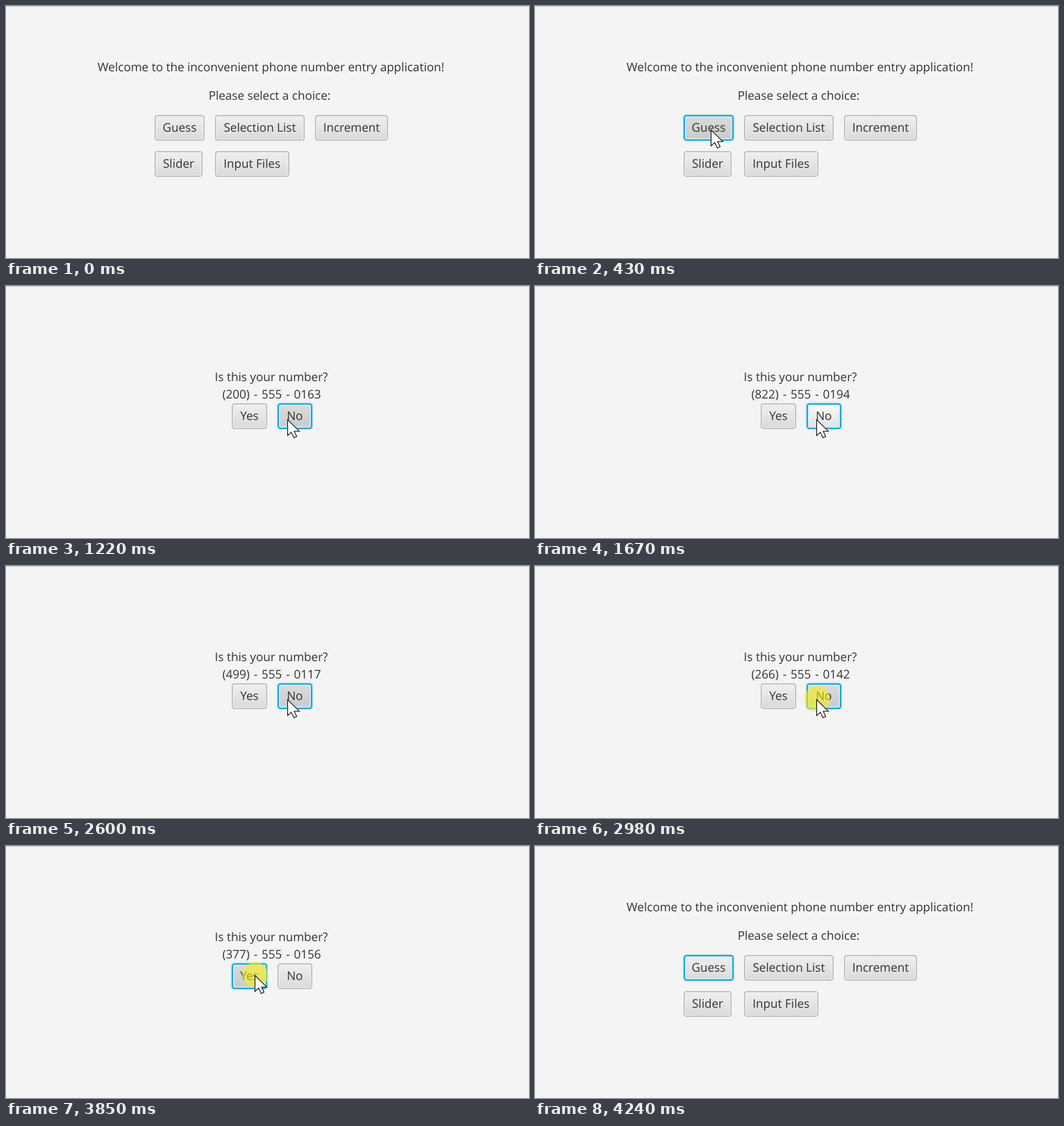
Animation, 753 px wide and 363 px high, one loop 4290 ms. Source, as an HTML page:

```html
<!DOCTYPE html>
<html lang="en">
<head>
<meta charset="utf-8">
<title>Inconvenient phone number entry</title>
<style>
:root {
  --up: linear-gradient(#f0f0f0, #d9d9d9);
  --over: linear-gradient(#fafafa, #e1e1e1);
  --down: linear-gradient(#dcdcdc, #c9c9c9);
  --plain: 0 0 0 0 transparent, inset 0 0 0 1.5px #b5b5b5, inset 0 0 0 2.6px #f6f6f6;
  --focus: 0 0 0 2px #039ed322, inset 0 0 0 1.8px #039ed3, inset 0 0 0 3.6px #d4e9f0;
}
html, body { margin: 0; width: 100%; height: 100%; overflow: hidden; background: #f4f4f4; }
body {
  position: relative;
  font: 17.1px/25px "Open Sans", "Noto Sans", sans-serif;
  color: #333;
  text-rendering: geometricPrecision;
  white-space: nowrap;
}
body::before { content: ""; position: absolute; inset: 0 0 auto; height: 1px; background: #bcbcbc; }
p, .btn, .num, .mouse, .mouse svg { position: absolute; margin: 0; }
p, .num { left: calc(var(--c) * 1px - 300px); top: calc(var(--y) * 1px); width: 600px; text-align: center; }
.btn {
  left: calc(var(--x) * 1px); top: calc(var(--y) * 1px); width: calc(var(--w) * 1px);
  height: 37px; line-height: 37px; text-align: center;
  border-radius: 4.5px; background-image: var(--up); box-shadow: var(--plain);
}
.num { height: 25px; overflow: hidden; word-spacing: 1.4px; }
.mouse { left: 0; top: 0; }
.mouse svg { left: 0; top: 0; overflow: visible; }
.spot { fill: #f5f014; fill-opacity: .6; }
.arrow { fill: #fff; stroke: #111; stroke-width: 1.1; }

/* 1% of the loop is 42.9 ms */
#menu, #ask, .btn, .num div, .mouse svg, .spot { animation: 4290ms step-end infinite; }
#menu { animation-name: menu; }
#ask { animation-name: ask; }
#guess { animation-name: guess-focus, guess-body; }
#list { animation-name: list-body; }
#yes { animation-name: yes-focus, yes-body; }
#no { animation-name: no-focus, no-body; }
.num div { animation-name: dial; }
.mouse svg { animation-name: seen; }
.spot { animation-name: spot; }
.mouse { animation: move 4290ms linear infinite; }

@keyframes menu { 0%, 91.14%, 100% { opacity: 1 } 13.75% { opacity: 0 } }
@keyframes ask { 0%, 91.14%, 100% { opacity: 0 } 13.75% { opacity: 1 } }
@keyframes seen { 0%, 98.83%, 100% { opacity: 0 } 1.39% { opacity: 1 } }

@keyframes guess-focus { 0% { box-shadow: var(--plain) } 9.79%, 100% { box-shadow: var(--focus) } }
@keyframes guess-body {
  0%, 13.75%, 100% { background-image: var(--up) }
  6.5% { background-image: var(--over) }
  9.79% { background-image: var(--down) }
}
@keyframes list-body {
  0%, 93%, 100% { background-image: var(--up) }
  91.14% { background-image: var(--over) }
}
@keyframes yes-focus {
  0%, 88.11%, 100% { box-shadow: var(--focus) }
  28.2% { box-shadow: var(--plain) }
}
@keyframes yes-body {
  0%, 22.6%, 91.14%, 100% { background-image: var(--up) }
  20.4%, 80.5% { background-image: var(--over) }
  88.11% { background-image: var(--down) }
}
@keyframes no-focus {
  0%, 88.11%, 100% { box-shadow: var(--plain) }
  28.2% { box-shadow: var(--focus) }
}
@keyframes no-body {
  0%, 78.7%, 100% { background-image: var(--up) }
  23.5%, 31.23%, 38.92%, 48.95%, 63.63%, 70.62%, 76.68% { background-image: var(--over) }
  28.2%, 35.89%, 46.15%, 60.6%, 67.83%, 73.65% { background-image: var(--down) }
}
@keyframes spot {
  0%, 13.75%, 31.23%, 38.92%, 48.95%, 63.63%, 70.62%, 76.68%, 91.14%, 100% { opacity: 0 }
  11.65%, 29.6%, 37.29%, 47.55%, 62.23%, 69.46%, 75.05%, 89.74% { opacity: 1 }
}
@keyframes dial {
  0% { transform: none }
  31.23% { transform: translateY(-25px) }
  38.92% { transform: translateY(-50px) }
  48.95% { transform: translateY(-75px) }
  63.63% { transform: translateY(-100px) }
  70.62% { transform: translateY(-125px) }
  76.68%, 100% { transform: translateY(-150px) }
}
@keyframes move {
  0%, 1.39% { transform: translate(388px, 222px) }
  3.2% { transform: translate(318px, 168px) }
  5% { transform: translate(272px, 149px); animation-timing-function: ease-out }
  8.2% { transform: translate(253px, 178px) }
  16.3% { transform: translate(253px, 178px); animation-timing-function: ease-in-out }
  25.2% { transform: translate(404px, 190px) }
  26.8% { transform: translate(405px, 192px) }
  76.68% { transform: translate(405px, 192px); animation-timing-function: ease-in-out }
  82.5% { transform: translate(358px, 186px) }
  91.14% { transform: translate(358px, 186px); animation-timing-function: ease-in }
  97.4%, 100% { transform: translate(342px, 322px) }
}
</style>
</head>
<body>
<div id="menu">
  <p style="--c:381.5;--y:76">Welcome to the inconvenient phone number entry application!</p>
  <p style="--c:379.5;--y:117">Please select a choice:</p>
  <div class="btn" id="guess" style="--x:214;--y:157;--w:72">Guess</div>
  <div class="btn" id="list" style="--x:301;--y:157;--w:129">Selection List</div>
  <div class="btn" style="--x:445;--y:157;--w:105">Increment</div>
  <div class="btn" style="--x:214;--y:209;--w:69">Slider</div>
  <div class="btn" style="--x:301;--y:209;--w:106.5">Input Files</div>
</div>
<div id="ask">
  <p style="--c:382;--y:119">Is this your number?</p>
  <div class="num" style="--c:382.5;--y:144">
    <div>
      (200) - 555 - 0163<br>
      (511) - 555 - 0128<br>
      (822) - 555 - 0194<br>
      (499) - 555 - 0117<br>
      (266) - 555 - 0142<br>
      (633) - 555 - 0185<br>
      (377) - 555 - 0156
    </div>
  </div>
  <div class="btn" id="yes" style="--x:325;--y:169;--w:51">Yes</div>
  <div class="btn" id="no" style="--x:391;--y:169;--w:49.5">No</div>
</div>
<div class="mouse">
  <svg width="20" height="28">
    <circle class="spot" cx="1" cy="0" r="18.5"/>
    <path class="arrow" d="M.5 .5V23.5L5.8 18.6L9.5 26.5L13.5 24.8L10 17.2H17.3Z"/>
  </svg>
</div>
</body>
</html>
```
